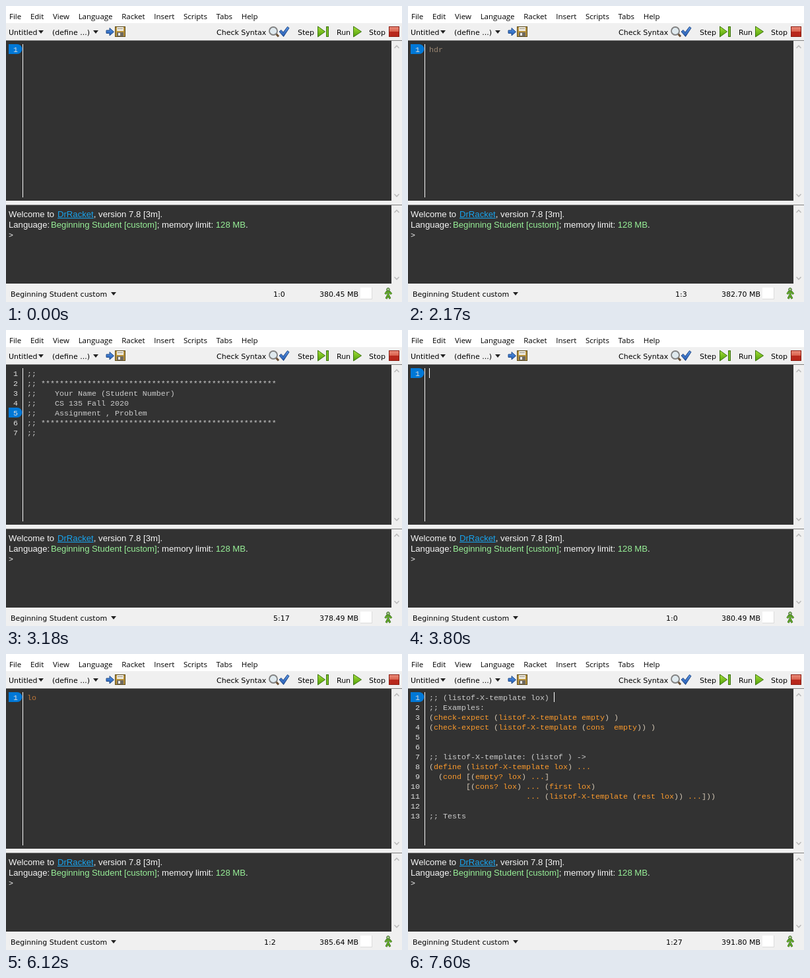
An HTML page with a canvas that plays this animation: 600 by 450 pixels, repeating every 8 s.

```html
<!DOCTYPE html>
<html lang="en">
<head>
<meta charset="utf-8">
<title>Editor templates</title>
<style>
html, body { margin: 0; width: 100%; height: 100%; overflow: hidden; background: #f0f0f0; }
canvas { display: block; width: 600px; height: 450px; }
</style>
</head>
<body>
<canvas id="stage" width="600" height="450"></canvas>
<script>
const ctx = document.getElementById('stage').getContext('2d');
const LOOP = 8000;
const UI = '11px "DejaVu Sans", Verdana, sans-serif';
const MENU = '11.5px "Open Sans", "Noto Sans", sans-serif';
const SANS = '13.15px "Liberation Sans", Arial, sans-serif';
const CODE = '11.667px "Liberation Mono", "Courier New", monospace';
const CELL = 7, ROW = 15, LEFT = 32, TOP = 58;
const DIM = '#9a8672', RUST = '#bd7638', ORANGE = '#fb9a2c';
const GREY = '#cbcbcb', WHITE = '#f6f6f6', BLUE = '#0078d7';

const stars = ';; ' + '*'.repeat(51);
const header = [
  ';;', stars, ';;    Your Name (Student Number)', ';;    CS 135 Fall 2020',
  ';;    Assignment , Problem', stars, ';;'
];
const template = [
  ';; (listof-X-template lox) ',
  ';; Examples:',
  '(check-expect (listof-X-template empty) )',
  '(check-expect (listof-X-template (cons  empty)) )',
  '', '',
  ';; listof-X-template: (listof ) ->',
  '(define (listof-X-template lox) ...',
  '  (cond [(empty? lox) ...]',
  '        [(cons? lox) ... (first lox)',
  '                     ... (listof-X-template (rest lox)) ...]))',
  '',
  ';; Tests'
];

const SELECT = 3640, CLEAR = 3800;
const BLINK = 470;
const blinks = [140, 1170, 2400, 3410, 4100, 5110, 5650, 7600];

const typed = (word, start, step, color) => [...word].map((_, i) =>
  ({ time: start + i * step, lines: [word.slice(0, i + 1)], row: 0, col: i + 1, color }));

const edits = [
  { time: 0, lines: [''], row: 0, col: 0 },
  ...typed('hdr', 620, 735, DIM),
  { time: 2630, lines: header, row: 4, col: 17 },
  { time: CLEAR, lines: [''], row: 0, col: 0 },
  ...typed('lox', 5030, 660, RUST),
  { time: 7130, lines: template, row: 0, col: 27, color: ORANGE }
];

// memory use at a few half-second ticks, linear in between
const usage = [[0, 380.45], [4, 382.7], [6, 378.49], [9, 384.48], [12, 385.64], [13, 387.32], [15, 391.8]];

function memory(t) {
  const tick = Math.floor(t / 500);
  const i = Math.max(1, usage.findIndex(([k]) => k >= tick));
  const [k0, v0] = usage[i - 1], [k1, v1] = usage[i];
  return v0 + (v1 - v0) * (tick - k0) / (k1 - k0);
}

const within = (t, a, b) => t >= a && t < b;

function rect(x, y, w, h, color) {
  ctx.fillStyle = color;
  ctx.fillRect(x, y, w, h);
}

// draws a string and returns where it ends
function text(s, x, y, color = '#000', font = UI) {
  ctx.font = font;
  ctx.fillStyle = color;
  ctx.fillText(s, x, y);
  return x + ctx.measureText(s).width;
}

function trace(points) {
  ctx.beginPath();
  points.forEach(([x, y]) => ctx.lineTo(x, y));
}

function line(points, color, width) {
  trace(points);
  ctx.strokeStyle = color;
  ctx.lineWidth = width;
  ctx.stroke();
}

function shape(points, fill, stroke) {
  trace(points);
  ctx.closePath();
  ctx.fillStyle = fill;
  ctx.fill();
  if (!stroke) return;
  ctx.strokeStyle = stroke;
  ctx.lineWidth = 1;
  ctx.stroke();
}

function disc(x, y, r, fill, stroke, width) {
  ctx.beginPath();
  ctx.arc(x, y, r, 0, 7);
  ctx.fillStyle = fill;
  ctx.fill();
  ctx.strokeStyle = stroke;
  ctx.lineWidth = width;
  ctx.stroke();
}

function fade(y0, y1, a, b) {
  const g = ctx.createLinearGradient(0, y0, 0, y1);
  g.addColorStop(0, a);
  g.addColorStop(1, b);
  return g;
}

const dropArrow = (x, y) => shape([[x, y], [x + 8, y], [x + 4, y + 5]], '#222');
const chevron = (y, dir) =>
  line([[588.5, y + 2 * dir], [592, y - 1.5 * dir], [595.5, y + 2 * dir]], '#bcbcbc', 1.6);
const play = (x, w) =>
  shape([[x, 31], [x + w, 39], [x, 47]], fade(31, 47, '#a6e03a', '#4f9e08'), '#3c7410');

function saveIcon() {
  shape([[152, 37], [157, 37], [157, 33.5], [163.5, 39.3], [157, 45], [157, 41.5], [152, 41.5]],
    fade(33, 45, '#5b9be8', '#1d56b0'), '#204a87');
  rect(165, 31, 16, 16, '#5c4a1c');
  rect(166, 32, 14, 14, '#b8923a');
  rect(168, 32, 10, 6, '#efece2');
  rect(169, 34, 8, 1, '#9a9382');
  rect(168, 40, 10, 6, '#6f6a60');
  rect(170, 41, 3, 4, '#e8e8e8');
}

function syntaxIcon() {
  line([[409, 42], [413, 46.5]], '#6b5034', 3);
  disc(405, 38, 6, '#dfe9ee', '#808080', 1.8);
  shape([[414, 39], [417, 36.5], [420, 40], [426.5, 31.5], [429, 33.5], [420.5, 46.5]],
    fade(31, 47, '#5c98e6', '#2257ad'), '#1f4684');
}

function stopIcon() {
  rect(580, 31, 16, 16, '#8a1a10');
  rect(581, 32, 14, 7, fade(32, 39, '#ea8a78', '#d9604c'));
  rect(581, 39, 14, 7, '#b8281c');
}

function figureIcon() {
  const limbs = (color, w) => {
    line([[579, 434], [579, 439], [576, 445]], color, w);
    line([[579, 439], [582, 445]], color, w);
    line([[574.5, 438], [577, 434.5], [581, 434.5], [584, 438]], color, w);
  };
  limbs('#2f5a1a', 3);
  disc(579, 431, 2.3, '#a9cf8c', '#2f5a1a', 1);
  limbs('#6cbb2a', 1.6);
}

function chrome() {
  rect(0, 0, 600, 450, '#f0f0f0');
  rect(0, 0, 600, 26, '#fff');
  'File Edit View Language Racket Insert Scripts Tabs Help'.split(' ')
    .reduce((x, s) => text(s, x, 20, '#000', MENU) + 13.7, 5);
  text('Untitled', 4, 44);
  dropArrow(49, 37);
  text('(define ...)', 70, 44);
  dropArrow(132, 37);
  saveIcon();
  text('Check Syntax', 319, 44);
  syntaxIcon();
  text('Step', 442, 44);
  play(472.5, 11);
  rect(485, 31, 4, 16, '#3c7410');
  rect(486, 32, 2, 14, '#7cc024');
  text('Run', 501, 44);
  play(526.5, 12);
  text('Stop', 550, 44);
  stopIcon();

  for (const [top, bottom] of [[53, 296], [303, 422]]) {
    rect(0, top - 1, 600, 1, '#808080');
    rect(0, top, 584, bottom - top, '#323232');
    chevron(top + 9, 1);
    chevron(bottom - 8, -1);
  }

  text('Beginning Student custom', 7, 442);
  dropArrow(159, 435);
  rect(537, 428, 18, 18, '#dcdcdc');
  rect(537, 428, 17, 17, '#fff');
  figureIcon();
}

function consolePane() {
  const green = '#98f098', link = '#18a4ee';
  const say = (s, x, y, color = WHITE) => text(s, x, y, color, SANS);
  say('Welcome to', 4, 321);
  const end = say('DrRacket', 78, 321, link);
  rect(78, 322, end - 78, 1, link);
  say(', version 7.8 [3m].', end, 321);
  say('Language:', 4, 337);
  const next = say('Beginning Student [custom]', 68, 337, green);
  say('.', say('128 MB', say('; memory limit: ', next, 337), 337, green), 337);
  text('>', 4, 352, WHITE, CODE);
}

function codeLine(s, y, color, selected) {
  if (selected) return text(s, LEFT, y, '#fff', CODE);
  if (s.startsWith(';')) return text(s, LEFT, y, GREY, CODE);
  for (const m of s.matchAll(/[()[\]]+|[^()[\]\s]+/g)) {
    const tone = /[()[\]]/.test(m[0]) ? '#d2c6b4' : color;
    text(m[0], LEFT + m.index * CELL, y, tone, CODE);
  }
}

function tag(y) {
  rect(4, y, 13, ROW, BLUE);
  ctx.beginPath();
  ctx.arc(17, y + ROW / 2, ROW / 2, -Math.PI / 2, Math.PI / 2);
  ctx.fill();
}

function popup() {
  rect(32, 75, 163, 16, '#000');
  rect(33, 76, 161, 14, '#e8e6fa');
  text('... no completions available', 36, 88, '#000',
    'italic 13px "Liberation Sans", Arial, sans-serif');
}

function editor(t) {
  const { lines, row, col, color } = edits.filter(e => e.time <= t).pop();
  const selected = within(t, SELECT, CLEAR);
  lines.forEach((s, i) => {
    const y = TOP + i * ROW;
    if (selected) rect(LEFT, y, i < lines.length - 1 ? 551 : s.length * CELL, ROW, BLUE);
    if (selected || i === row) tag(y);
    const n = String(i + 1);
    text(n, 18 - n.length * CELL, y + 12, '#e0e0e0', CODE);
    codeLine(s, y + 12, color, selected);
  });
  rect(25, TOP, 1, 233, WHITE);
  if (!selected && blinks.some(b => within(t, b, b + BLINK)))
    rect(LEFT + col * CELL, TOP + row * ROW, 1, ROW, '#fff');
  if (within(t, 6500, 7050)) popup();
  text(selected ? '1:0-7:2' : `${row + 1}:${col}`, t < SELECT ? 405 : 391, 442);
}

function draw(t) {
  chrome();
  consolePane();
  editor(t);
  text(memory(t).toFixed(2) + ' MB', 475, 442);
}

const start = performance.now();
function frame() {
  draw((performance.now() - start) % LOOP);
  requestAnimationFrame(frame);
}
frame();
</script>
</body>
</html>
```
